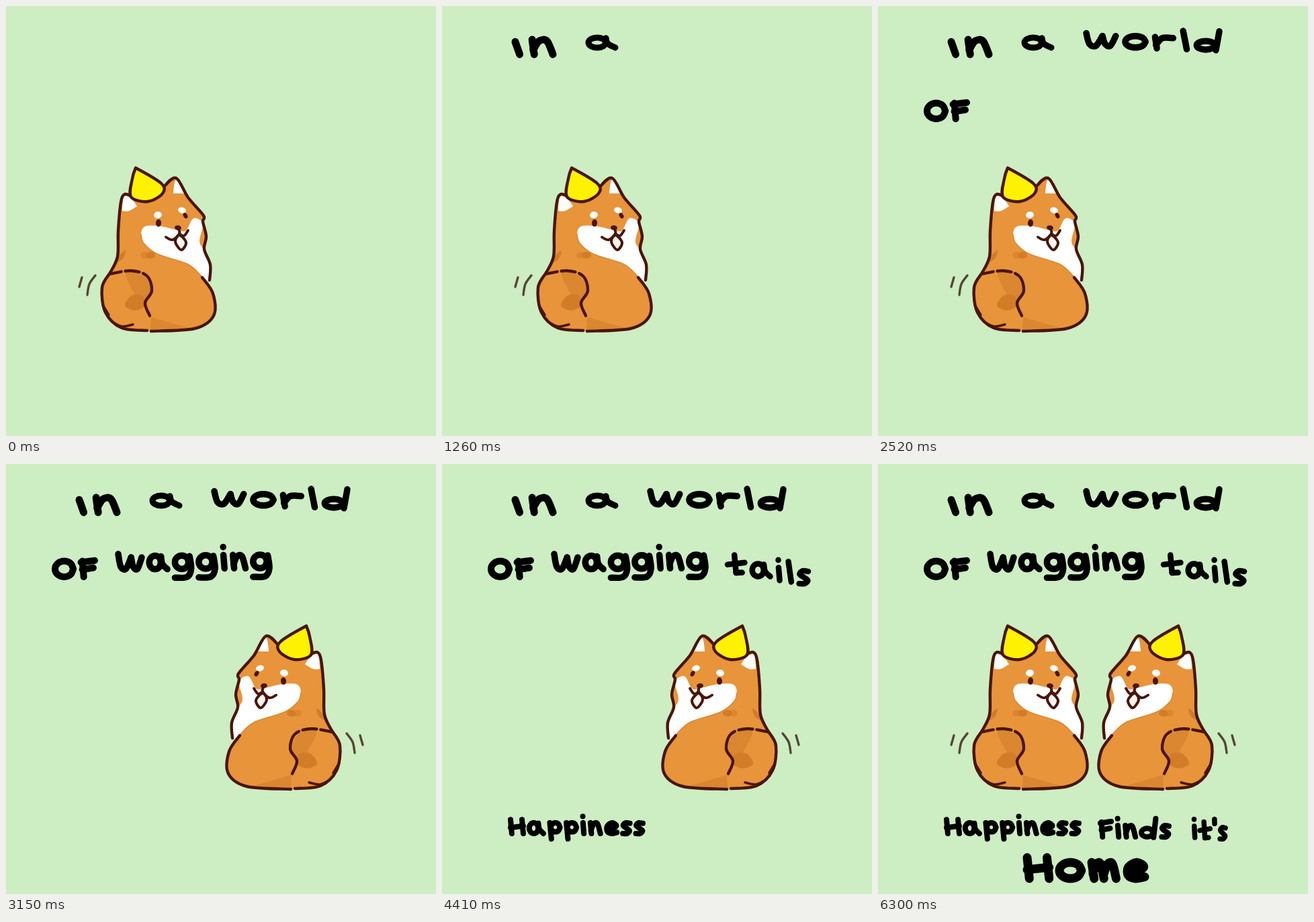
These frames come from a looping animation (640 px wide and 640 px high, 6930 ms). An HTML page with a canvas:

```html
<!DOCTYPE html>
<html lang="en">
<head>
<meta charset="utf-8">
<title>Wagging tails</title>
<style>
  html, body { margin: 0; width: 100%; height: 100%; overflow: hidden; background: #cceec2; }
  canvas { display: block; width: 100vw; height: 100vh; }
</style>
</head>
<body>
<canvas id="stage" width="640" height="640" role="img"
  aria-label="In a world of wagging tails happiness finds it's home"></canvas>
<script>
const ctx = document.getElementById('stage').getContext('2d');
const STEP = 630;
const INK = '#4a150b', FUR = '#e8943a', SHADE = '#d37c28', SOFT = '#db8630';

// "x,y x,y ..." to points; a trailing "!" marks a corner.
const parse = text => text.split(' ').map(s => [...s.split(',').map(parseFloat), s.endsWith('!')]);

// Smooth curve through all points.
function curve(points, closed) {
  const n = points.length, path = new Path2D();
  const at = i => closed ? points[(i + n) % n] : points[Math.max(0, Math.min(n - 1, i))];
  const slope = (i, k) => at(i)[2] ? 0 : (at(i + 1)[k] - at(i - 1)[k]) / 6;
  path.moveTo(at(0)[0], at(0)[1]);
  for (let i = 0; i < (closed ? n : n - 1); i++) {
    const a = at(i), b = at(i + 1);
    path.bezierCurveTo(a[0] + slope(i, 0), a[1] + slope(i, 1),
      b[0] - slope(i + 1, 0), b[1] - slope(i + 1, 1), b[0], b[1]);
  }
  return path;
}

function stroke(path, width, color) {
  ctx.lineWidth = width;
  ctx.strokeStyle = color;
  ctx.stroke(path);
}

function line(text, width = 4.4, color = INK) {
  stroke(curve(parse(text)), width, color);
}

function fill(text, color, outline) {
  const path = curve(parse(text), true);
  ctx.fillStyle = color;
  ctx.fill(path);
  if (outline) stroke(path, outline, INK);
}

function oval(x, y, rx, ry, color, tilt = 0) {
  ctx.fillStyle = color;
  ctx.beginPath();
  ctx.ellipse(x, y, rx, ry, tilt, 0, 7);
  ctx.fill();
}

// --- Dog ---

const SIDE = '155,397 166,373 167,335 171,292 177,280 188,284';
const FACE = '234,270 253,256 271,285 294,312 293,321 298,343 295,362 304,385 303,408';
const BELLY = '292,404 308,428 309,461 281,480 216,484';
const TAIL = '210,483 172,479 148,456 143,419 155,397';
const CHEST = '201,340 205,353 225,369 270,384 291,402';

function drawCoat() {
  fill([SIDE, FACE, BELLY, TAIL].join(' '), FUR);
  fill(CHEST + ' 303,408 304,385 295,364 288,350 293,324 279,316 268,334 257,334 231,328 207,328', '#fff');
  line(CHEST, 1.5, SOFT);
  fill('174,282! 173,305! 183,305 195,298! 186,286', '#fff');
  fill('253,259 249,279! 267,279!', '#fff');
  fill('165,381 169,371 178,364 174,376', SHADE);
  oval(206, 371, 6, 5, SOFT);
  oval(215, 371, 7, 5, SHADE);
  fill('216,463! 271,479! 215,483!', SOFT);
  fill('178,398 205,402 215,424 206,442 195,434', SOFT);
  fill('187,431 203,431 207,446 192,453 177,446', SHADE);
}

function drawFeatures() {
  oval(226, 311, 6, 5, '#fff', -0.2);
  oval(262, 304, 6, 4.5, '#fff', 0.3);
  oval(227, 323, 4, 5.5, INK, 0.1);
  oval(267, 312, 3, 4.5, INK, -0.5);
  oval(256, 330, 5, 3.5, INK, 0.15);
  fill('258,341 268,352 261,363 252,351', '#fff6ef', 4);
  line('257,332 258,339 248,348 238,344', 4);
  line('258,339 265,342 271,334', 4);
}

function drawOutline() {
  [SIDE, FACE, BELLY, TAIL].forEach(part => line(part));
  ctx.setLineDash([18, 6, 21, 6, 200, 0]);
  line('154,399 186,394 210,402 217,424 207,442 214,461');
  ctx.setLineDash([]);
  line('163,473 174,477 189,474', 3.5);
  line('144,445 153,460', 3.5);
  fill('193,241! 188,257 186,284 211,291 233,279 231,264', '#fff200', 4.4);
}

function drawDog(mirrored) {
  ctx.save();
  if (mirrored) ctx.transform(-1, 0, 0, 1, 640, 0);
  drawCoat();
  drawFeatures();
  drawOutline();
  line('109,418 113,404', 3.4, '#594338');
  line('121,430 124,414 133,401', 3.4, '#594338');
  ctx.restore();
}

// --- Lettering: x runs 0..1 across a letter, y is 0 on the baseline, -1 at x-height ---

const CAP = -1.3;
const stem = (x, top = -1, bottom = 0, lean = 0.1) => [[x, top], [x + lean, bottom]];
const bar = (y, x0 = 0, x1 = 1) => [[x0, y], [x1, y - 0.15]];
const dot = (x, y) => [[x, y], [x, y + 0.01]];
const arch = (x0, x1) => {
  const w = x1 - x0;
  return [[x0, -0.3], [x0 + w * 0.3, -0.9], [x0 + w * 0.7, -0.9], [x1, 0]];
};
const cup = (x0, x1, top) => {
  const w = x1 - x0;
  return [[x0, top], [x0 + w * 0.2, -0.2], [x0 + w * 0.6, -0.05], [x1, -0.9]];
};
const bowl = (x0, x1, top = -1, bottom = 0) => Array.from({ length: 9 }, (_, i) => {
  const a = i * Math.PI / 4;
  return [(x0 + x1) / 2 + Math.cos(a) * (x1 - x0) / 2,
    (top + bottom) / 2 + Math.sin(a) * (bottom - top) / 2];
});

// Letter: relative width, then strokes. The dotless "ı" opens the first line.
const LETTERS = {
  a: [1, bowl(0, 0.65), [[0.65, -0.95], [0.72, -0.4], [1, 0]]],
  d: [1, bowl(0, 0.8, -0.75), stem(1, -1.6, 0.05, -0.15)],
  e: [0.75, [[0.1, -0.42], [0.65, -0.5], [0.95, -0.75], [0.55, -1], [0.1, -0.7], [0.1, -0.2], [0.5, 0], [1, -0.1]]],
  g: [0.9, bowl(0, 0.85), [[0.9, -0.95], [1, 0], [0.75, 0.6], [0, 0.65]]],
  i: [0.15, stem(0.3, -1, 0, 0.4), dot(0.2, -1.6)],
  'ı': [0.15, stem(0, -0.85, 0, 1)],
  l: [0.2, stem(0.1, -1.6, 0, 0.8)],
  m: [1, stem(0), arch(0.05, 0.5), arch(0.5, 1)],
  n: [0.7, stem(0), arch(0.05, 1)],
  o: [0.9, bowl(0, 1)],
  p: [0.75, stem(0.05, -1, 0.5, 0.15), bowl(0.15, 1, -1, -0.15)],
  r: [0.8, stem(0), [[0.05, -0.3], [0.4, -0.9], [1, -0.9]]],
  s: [0.5, [[1, -0.95], [0.4, -1], [0.05, -0.75], [0.5, -0.5], [0.95, -0.25], [0.6, 0], [0, 0]]],
  t: [0.95, stem(0.4, -1.4), [[0.5, 0], [0.85, -0.02]], bar(-0.65)],
  w: [1.3, cup(0, 0.55, -1.15), cup(0.55, 1, -0.9)],
  F: [0.75, stem(0.1, CAP), bar(CAP + 0.1), bar(-0.6, 0.1, 0.9)],
  H: [0.9, stem(0, CAP), stem(0.9, CAP), bar(-0.55)],
  O: [1, bowl(0, 1, CAP)],
  "'": [0.1, stem(0, -1.7, -1.3)]
};
const GAP = 0.42;

// text, left, right, baseline, x-height, pen width, rise per pixel
const WORDS = [
  ['ın', 109, 165, 72, 22, 11, 0],
  ['a', 218, 258, 62, 15, 9, 0],
  ['world', 310, 508, 60, 17, 9.5, 0.03],
  ['OF', 73, 132, 168, 18, 10, 0],
  ['wagging', 167, 392, 157, 20, 9.5, -0.01],
  ['tails', 425, 545, 162, 19, 8.5, 0.15],
  ['Happiness', 102, 299, 550, 16, 8, 0],
  ['Finds', 331, 433, 555, 17, 8, 0],
  ["it's", 470, 517, 556, 17, 7.5, 0.05],
  ['Home', 222, 397, 617, 24, 13, 0]
];

function drawWord([text, left, right, base, size, pen, rise]) {
  const letters = [...text].map(c => LETTERS[c]);
  const total = letters.reduce((sum, [w]) => sum + w, GAP * (letters.length - 1));
  const unit = (right - left) / total;
  let x = left;
  for (const [w, ...strokes] of letters) {
    const y = base + (x - left) * rise;
    for (const s of strokes)
      stroke(curve(s.map(([u, v]) => [x + u * w * unit, y + v * size])), pen, '#000');
    x += (w + GAP) * unit;
  }
}

// --- Timeline: one more word per step, the dog swaps sides, both meet at the end ---

function render(time) {
  const step = Math.floor(time / STEP) % (WORDS.length + 1);
  const last = step === WORDS.length;
  ctx.fillStyle = '#cceec2';
  ctx.fillRect(0, 0, 640, 640);
  ctx.lineCap = ctx.lineJoin = 'round';
  WORDS.slice(0, step).forEach(drawWord);
  if (last || step % 2 === 0) drawDog(false);
  if (last || step % 2 === 1) drawDog(true);
}

const start = performance.now();
function tick(now) {
  render(Math.max(0, now - start));
  requestAnimationFrame(tick);
}
render(0);
requestAnimationFrame(tick);
</script>
</body>
</html>
```
